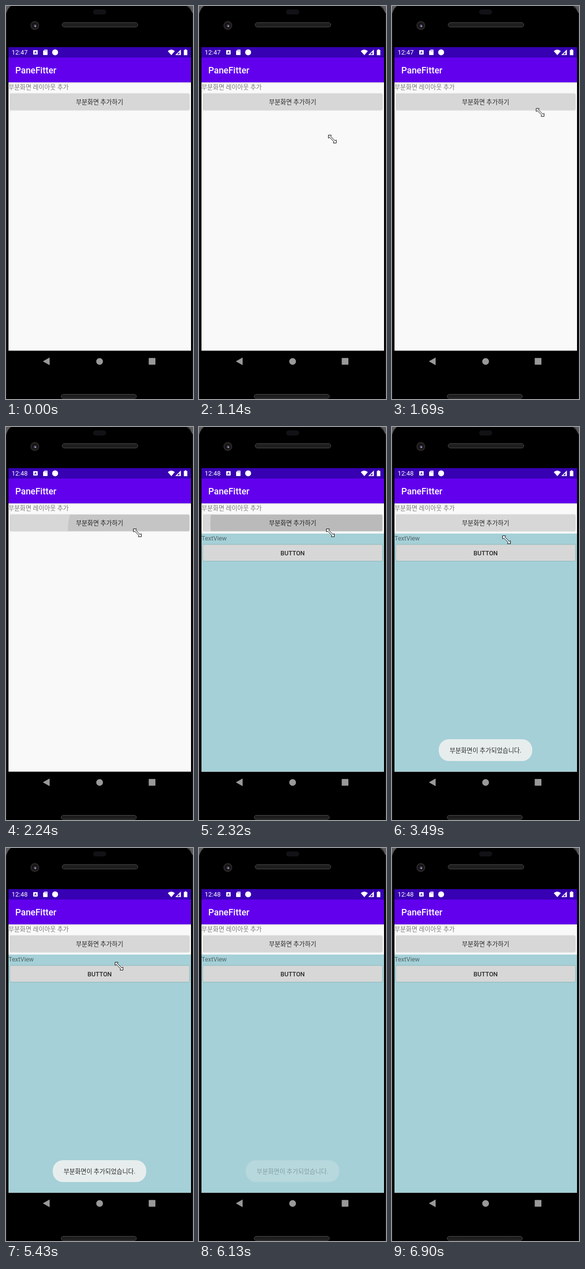
Recreate the animation shown at these times as an HTML page. Size 378x793 px, loop 7.31 s.

```html
<!DOCTYPE html>
<html lang="ko">
<head>
<meta charset="utf-8">
<title>Layout demo</title>
<style>
html, body { margin: 0; width: 100%; height: 100%; overflow: hidden; background: #000; }
svg { display: block; width: 378px; height: 793px; overflow: hidden; }
text { font: 400 12.57px Roboto, "Noto Sans CJK KR", "Noto Sans CJK", sans-serif; white-space: pre; }
.mid { text-anchor: middle; }
.medium { font-weight: 500; }
.title { font-size: 17.96px; }
.time { font-size: 12.9px; }
.soft { fill: rgba(0, 0, 0, .52); }
.dark { fill: rgba(0, 0, 0, .82); }
.white { fill: #fff; }
.btn { fill: #d6d7d6; filter: drop-shadow(0 .6px .8px rgba(0, 0, 0, .28)); }
#late, #panel, #toast, #ripple { opacity: 0; }
#cursor { transform: translate(400px, 760px); }
</style>
</head>
<body>
<svg viewBox="0 0 378 793">
  <defs>
    <linearGradient id="shade" x2="0" y2="1">
      <stop stop-color="#000" stop-opacity=".15"/>
      <stop offset="1" stop-color="#000" stop-opacity="0"/>
    </linearGradient>
    <pattern id="mesh" width="3" height="3" patternUnits="userSpaceOnUse">
      <rect width="3" height="3" fill="#141414"/>
      <circle cx="1.5" cy="1.5" r=".9" fill="#343434"/>
    </pattern>
    <clipPath id="inButton"><rect x="8" y="177" width="362.5" height="33" rx="2"/></clipPath>
  </defs>

  <!-- phone body -->
  <path d="M0 0H14Q4 4 0 16ZM378 0H364Q374 4 378 16Z" fill="#5a5a5c"/>
  <rect x=".5" y="-6" width="377" height="900" rx="26" stroke="#1c1c1e"/>
  <path d="M354 -5.5Q370 -2 377 13" fill="none" stroke="#77777a"/>
  <rect x="176" y="7" width="26.5" height="10" rx="5" fill="#121216"/>
  <circle cx="58.3" cy="39.3" r="9" fill="#2a2625"/>
  <circle cx="58.3" cy="39.3" r="6.3" fill="#171416"/>
  <circle cx="58.8" cy="40" r="2.7" fill="#52506c"/>
  <circle cx="59.6" cy="41" r="1.2" fill="#b4b2d2"/>
  <g fill="url(#mesh)" stroke="#484848">
    <rect x="113.5" y="33.5" width="153" height="9" rx="4.5"/>
    <rect x="111.5" y="783.5" width="152" height="8.5" rx="4.25"/>
  </g>

  <!-- app screen -->
  <rect x="5" y="83" width="369" height="612.5" fill="#f9f9f9"/>
  <text class="soft" x="5" y="167.5">부분화면 레이아웃 추가</text>
  <rect class="btn" x="8" y="177" width="362.5" height="33" rx="2"/>
  <g clip-path="url(#inButton)"><circle id="ripple" r="182"/></g>
  <text class="dark mid" x="189.3" y="197.5">부분화면 추가하기</text>

  <g id="panel">
    <rect x="5" y="215" width="369" height="480.5" fill="#a5d0d7"/>
    <text class="soft" x="5" y="228.5">TextView</text>
    <rect class="btn" x="8" y="237.5" width="362.5" height="32.5" rx="2"/>
    <text class="dark mid medium" x="189.3" y="258.7">BUTTON</text>
  </g>

  <rect x="5" y="154" width="369" height="2.5" fill="url(#shade)"/>
  <rect x="5" y="104" width="369" height="50" fill="#6200ee"/>
  <text class="white medium title" x="18.8" y="136.3">PaneFitter</text>

  <!-- status bar -->
  <rect x="5" y="83" width="369" height="21" fill="#3700b3"/>
  <g class="white">
    <text id="early" class="time" x="11.6" y="98.3">12:47</text>
    <text id="late" class="time" x="11.6" y="98.3">12:48</text>
    <rect x="55" y="89" width="9" height="9" rx="1"/>
    <path d="M78 88H83Q84 88 84 89V98Q84 99 83 99H76Q75 99 75 98V91Z"/>
    <circle cx="99.3" cy="93.5" r="6"/>
    <path d="M327 91Q334 85.2 341.3 91L334.2 99.3Z"/>
    <path d="M342.2 99L353.5 87.7V99Z"/>
    <path d="M361.5 87.5H364.5V88.7H366.5V99.3H359.5V88.7H361.5Z"/>
  </g>
  <path d="M346 97.5L350.5 93V97.5Z" fill="#3700b3"/>
  <path d="M57.6 96.2L59.5 91.3L61.4 96.2M58.3 94.7H60.7" fill="none" stroke="#3700b3"/>
  <path d="M78.5 89.3V91.3M80.5 89.3V91.3M82.5 89.3V91.3" stroke="#3700b3" stroke-width=".7"/>

  <!-- navigation bar -->
  <g fill="#999">
    <path d="M74.5 717L88.2 709.2V724.8Z"/>
    <circle cx="189.2" cy="717.2" r="6.8"/>
    <rect x="288.5" y="710.3" width="13.5" height="13.5" rx=".8"/>
  </g>

  <g id="toast">
    <rect x="94.5" y="630" width="189" height="44" rx="20.5" fill="#e7eded"/>
    <text class="dark mid" x="189" y="656.5">부분화면이 추가되었습니다.</text>
  </g>

  <path id="cursor" fill="#fff" stroke="#000"
    d="M.5 .5H6.5V1.5L5 3L14 12L15.5 10.5H16.5V16.5H10.5V15.5L12 14L3 5L1.5 6.5H.5Z"/>
</svg>
<script>
const LOOP = 7310;
const TICK = LOOP / 94;
const PHASE = 284 % TICK;
const at = (x, y) => `translate(${x}px, ${y}px)`;
const animations = [];

// Keys are [ms, value, easing]; the first and last values fill the rest of the loop.
function play(id, prop, keys) {
  const all = [[0, keys[0][1]], ...keys, [LOOP, keys[keys.length - 1][1]]];
  const frames = all.map(([ms, value, easing = 'linear']) => ({ offset: ms / LOOP, [prop]: value, easing }));
  const animation = document.getElementById(id).animate(frames, { duration: LOOP, iterations: Infinity });
  animation.pause();
  animations.push(animation);
}

const swap = (id, ms, from, to) => play(id, 'opacity', [[ms, from], [ms, to]]);

function fade(id, peak, inStart, inEnd, outStart, outEnd) {
  play(id, 'opacity', [[inStart, 0], [inEnd, peak], [outStart, peak], [outEnd, 0]]);
}

// Each leg leaves the previous point at start and rests at (x, y) from end.
function travel(id, x0, y0, legs) {
  let here = at(x0, y0);
  play(id, 'transform', legs.flatMap(([start, end, x, y]) => {
    const from = here;
    here = at(x, y);
    return [[start, from], [end, here]];
  }));
}

travel('cursor', 378, 760, [
  [212, 680, 322, 467],
  [832, 990, 341, 325],
  [990, 1135, 261, 260],
  [1140, 1370, 341, 208],
  [1460, 1835, 257, 205],
  [2790, 3235, 223, 219],
  [5350, 5410, 220, 230],
  [5420, 5570, 300, 267],
  [5580, 5640, 400, 760]
]);

swap('early', 2150, 1, 0);
swap('late', 2150, 0, 1);
swap('panel', 2300, 0, 1);

// The ripple grows from the touch point towards the button's centre.
play('ripple', 'transform', [
  [2181, at(265, 209) + ' scale(.6)', 'cubic-bezier(.4, 0, .2, 1)'],
  [2381, at(189, 193.5) + ' scale(1)']
]);
fade('ripple', .135, 2130, 2290, 2330, 2690);
fade('toast', 1, 2380, 2800, 5740, 6270);

function draw() {
  const now = performance.now() % LOOP;
  const held = Math.max(0, Math.floor((now - PHASE) / TICK) * TICK + PHASE);
  for (const animation of animations) animation.currentTime = held;
  requestAnimationFrame(draw);
}
draw();
</script>
</body>
</html>
```
